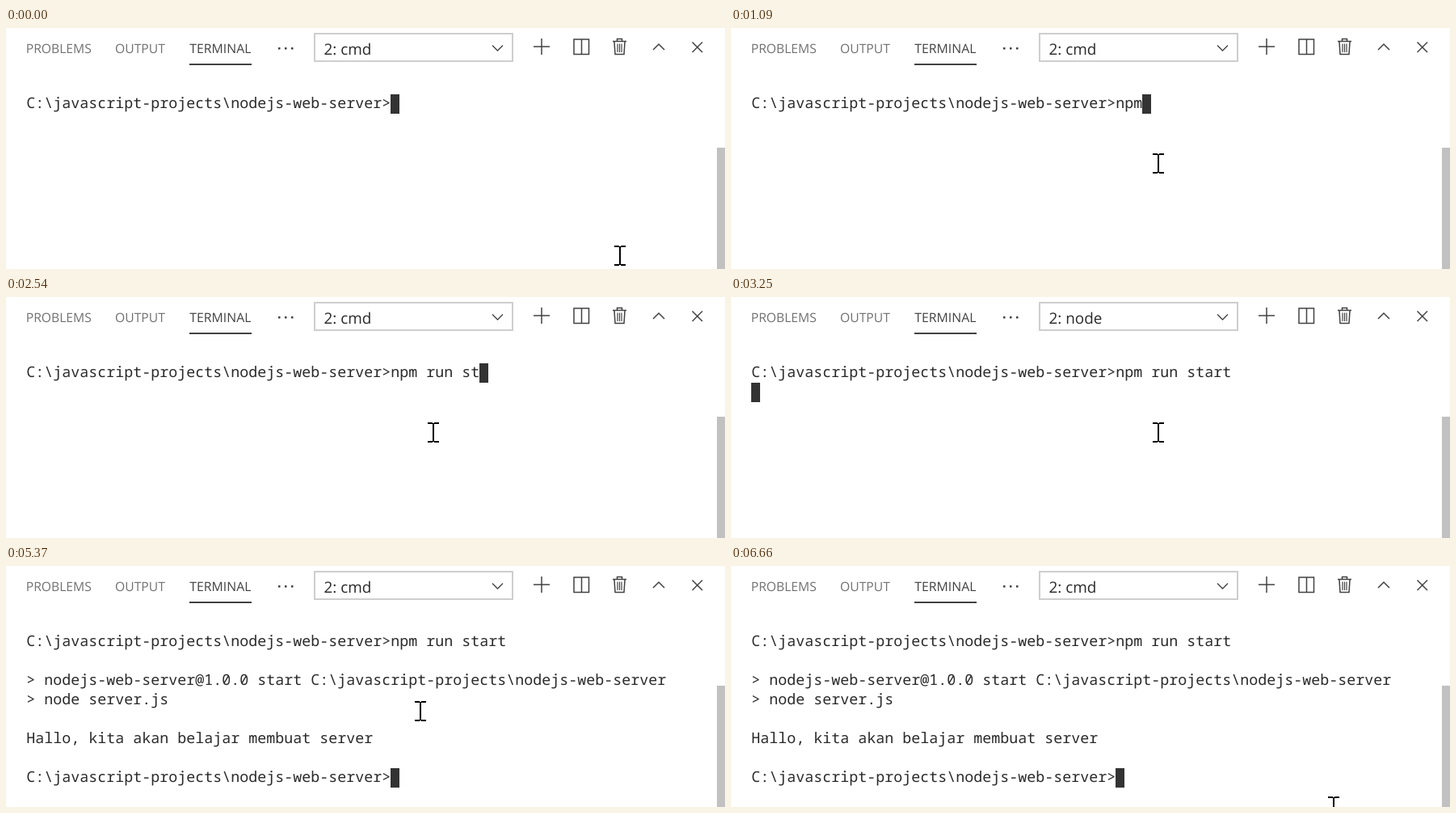
An HTML page with a canvas that plays this animation: 890x298 px, repeating every 7820 ms.

```html
<!DOCTYPE html>
<html lang="en">
<head>
<meta charset="utf-8">
<title>Terminal</title>
<style>
  html, body { margin: 0; width: 100%; height: 100%; overflow: hidden; background: #fff; }
  canvas { display: block; }
</style>
</head>
<body>
<canvas id="stage" width="890" height="298"></canvas>
<script>
const ctx = document.getElementById('stage').getContext('2d');
const LOOP = 7820, TICK = 77.4;
const CELL = 11, ROW = 24, LEFT = 25, TOP = 82;
const INK = '#2a2a2a', BLOCK = '#333', UI = '#424242', MUTED = '#717171';
const MONO = '18.33px "Noto Sans Mono", "DejaVu Sans Mono", monospace';
const SANS = '"Open Sans", "Noto Sans", sans-serif';

const FOLDER = 'C:\\javascript-projects\\nodejs-web-server';
const PROMPT = FOLDER + '>';
const ENTER = 3250, START = 4490, DONE = 4560, RENAME = 4870;

// Times and steps of typing and pointer moves are counted in ticks.
const BURSTS = [
  { text: 'npm ', from: 11, step: 1.6 },
  { text: 'run', from: 19, step: 1.4 },
  { text: ' s', from: 28, step: 3 },
  { text: 'tart', from: 33, step: 2 }
];

const easeInOut = u => u * u * (3 - 2 * u);
const easeOut = u => 1 - (1 - u) ** 3;
const HOME = { x: 760, y: 281 };
const MOVES = [
  { from: 0, to: 5, x: 518, y: 163, ease: easeInOut },
  { from: 5, to: 6, x: 529, y: 167, ease: easeInOut },
  { from: 68, to: 73, x: 497, y: 192, ease: easeOut },
  { from: 80, to: 86, x: 746, y: 297, ease: easeInOut }
];

const clamp = (v, lo, hi) => Math.min(hi, Math.max(lo, v));

function rect(x, y, w, h, color) {
  ctx.fillStyle = color;
  ctx.fillRect(x, y, w, h);
}

function line(points, width = 1.5) {
  ctx.beginPath();
  points.forEach(([x, y]) => ctx.lineTo(x, y));
  ctx.lineWidth = width;
  ctx.strokeStyle = UI;
  ctx.stroke();
}

function box(x, y, w, h, width, color = UI) {
  ctx.lineWidth = width;
  ctx.strokeStyle = color;
  ctx.strokeRect(x, y, w, h);
}

function label(text, x, y, size, color) {
  ctx.font = `${size}px ${SANS}`;
  ctx.fillStyle = color;
  ctx.fillText(text, x, y);
}

function drawTabs() {
  label('PROBLEMS', 24.7, 31, 15.7, MUTED);
  label('OUTPUT', 135, 31, 15.7, MUTED);
  label('TERMINAL', 227.3, 31, 15.8, UI);
  rect(227, 44, 77, 2, UI);
  for (let i = 0; i < 3; i++) rect(337 + i * 8, 24, 2.5, 2.5, UI);
}

function drawTools(shell) {
  box(382, 7, 245, 34, 2, '#cecece');
  label('2: ' + shell, 393.5, 33, 18.9, INK);
  line([[602, 21.5], [608.5, 28], [615, 21.5]], 1.3);

  // Plus
  line([[653, 23], [673, 23]]);
  line([[663, 13], [663, 33]]);

  // Split
  box(703, 14, 18.5, 18.5, 1.5);
  line([[712.5, 14], [712.5, 32.5]]);

  // Bin
  line([[751, 16.5], [768, 16.5]]);
  line([[756.5, 16], [756.5, 13.5], [762.5, 13.5], [762.5, 16]]);
  line([[753, 17], [754, 32.5], [765, 32.5], [766, 17]]);
  for (let x = 757; x <= 762; x += 2.5) line([[x, 19.5], [x, 30]], 1.2);

  // Collapse and close
  line([[801, 27], [808, 20], [815, 27]]);
  line([[849.5, 17.5], [862, 30]]);
  line([[862, 17.5], [849.5, 30]]);

  rect(880, 148, 10, 150, '#c1c1c1');
}

function typedAt(tick) {
  return BURSTS.map(({ text, from, step }) => {
    const count = Math.floor((tick + 0.5 - from) / step) + 1;
    return text.slice(0, clamp(count, 0, text.length));
  }).join('');
}

function drawTerminal(t, tick) {
  const rows = [PROMPT + typedAt(tick)];
  if (t >= START) {
    rows.push('', `> nodejs-web-server@1.0.0 start ${FOLDER}`, '> node server.js', '');
  }
  if (t >= DONE) rows.push('Hallo, kita akan belajar membuat server', '', PROMPT);
  else if (t >= ENTER) rows.push('');

  ctx.font = MONO;
  ctx.fillStyle = INK;
  rows.forEach((text, r) => {
    [...text].forEach((ch, c) => ctx.fillText(ch, LEFT + 0.3 + c * CELL, TOP + r * ROW + 17));
  });
  const last = rows.length - 1;
  rect(LEFT + rows[last].length * CELL, TOP + last * ROW, CELL, ROW, BLOCK);
}

function pointerAt(tick) {
  return MOVES.reduce((p, m) => {
    const k = m.ease(clamp((tick - m.from) / (m.to - m.from), 0, 1));
    return { x: p.x + (m.x - p.x) * k, y: p.y + (m.y - p.y) * k };
  }, HOME);
}

function drawPointer(tick) {
  const p = pointerAt(tick);
  const x = Math.round(p.x), y = Math.round(p.y);
  for (const edge of [y - 12, y + 11]) {
    rect(x - 7, edge, 6, 2, '#000');
    rect(x + 1, edge, 6, 2, '#000');
  }
  rect(x - 1, y - 11, 2, 23, '#000');
}

function draw(t) {
  const tick = Math.floor(t / TICK + 0.2);
  rect(0, 0, 890, 298, '#fff');
  ctx.textRendering = 'geometricPrecision';
  drawTabs();
  drawTools(t >= ENTER && t < RENAME ? 'node' : 'cmd');
  drawTerminal(t, tick);
  drawPointer(tick);
}

const begin = performance.now();
function loop() {
  draw((performance.now() - begin) % LOOP);
  requestAnimationFrame(loop);
}
loop();
</script>
</body>
</html>
```
